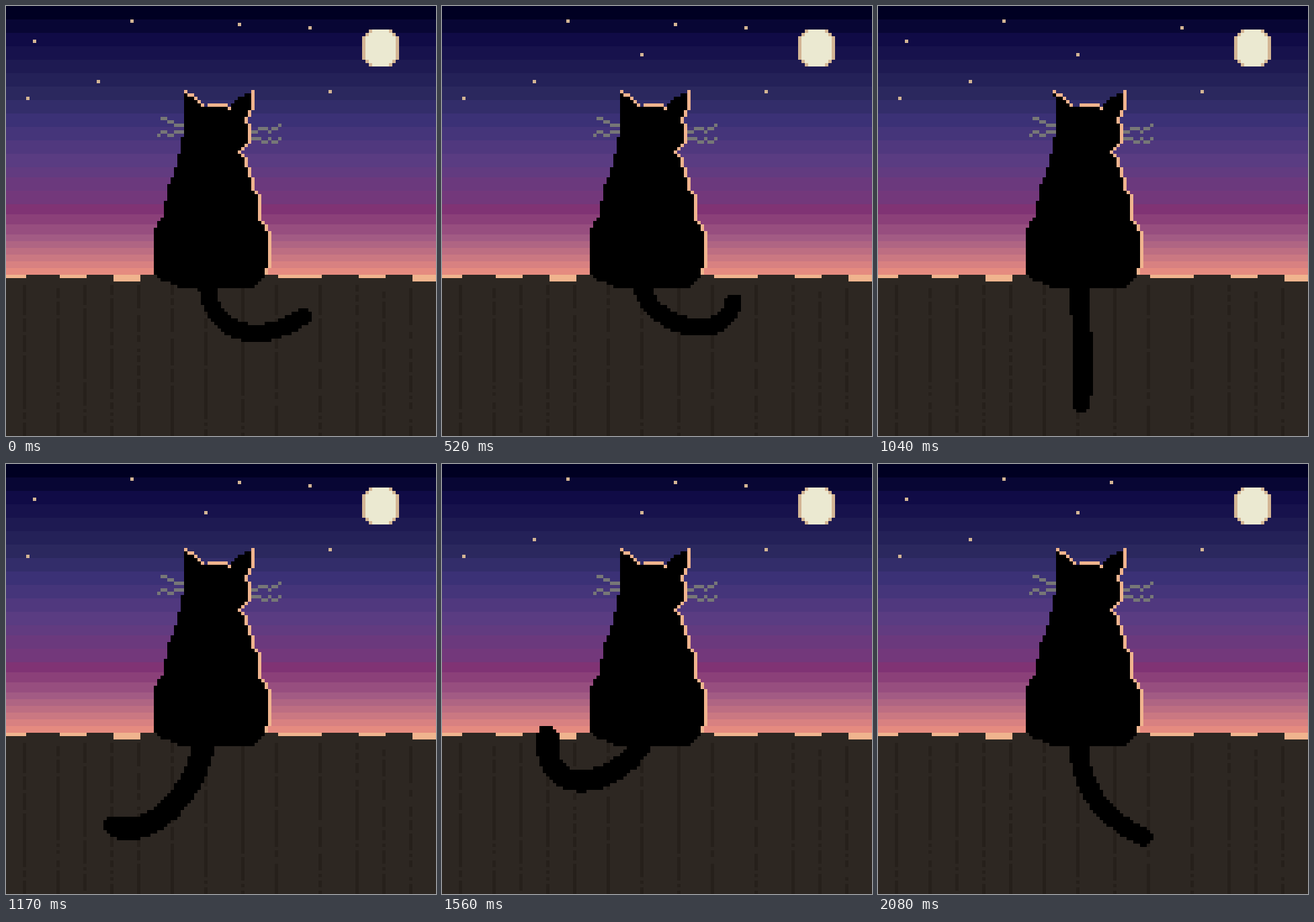
Write an HTML page with a canvas that moves like this. It is 640 by 640 pixels and loops after 2.21 s.

```html
<!DOCTYPE html>
<html lang="en">
<head>
<meta charset="utf-8">
<title>Cat on a fence</title>
<style>
  html, body { margin: 0; width: 100%; height: 100%; overflow: hidden; background: #000022; }
  canvas { display: block; width: 640px; height: 640px; }
</style>
</head>
<body>
<canvas id="stage" width="640" height="640"></canvas>
<script>
const ctx = document.getElementById('stage').getContext('2d');
const CELL = 5, STEP_MS = 130, STEPS = 17;
const RIM = '#f0b48e', BLACK = '#000000';

const snap = v => Math.floor(v / CELL) * CELL;
const lerp = (a, b, t) => a + (b - a) * t;

function rect(color, x, y, w = CELL, h = CELL) {
  ctx.fillStyle = color;
  ctx.fillRect(x, y, w, h);
}

// Interpolates between [position, value, value...] keys
function between(keys, at) {
  const next = Math.max(1, keys.findIndex(key => key[0] >= at));
  const a = keys[next - 1], b = keys[next];
  return a.slice(1).map((v, i) => lerp(v, b[i + 1], (at - a[0]) / (b[0] - a[0])));
}

// Band number, then red, green, blue
const SKY = [[0, 0, 0, 34], [2, 16, 11, 70], [6, 43, 40, 94], [8, 59, 49, 118], [11, 90, 60, 130],
  [14, 115, 56, 123], [15, 128, 51, 116], [18, 162, 91, 132], [23, 229, 139, 128], [24, 240, 180, 142]];

function drawSky() {
  for (let band = 0, y = 0; band < 25; band++) {
    const height = band < 12 || band === 13 || band === 14 ? 20 : band < 18 ? 15 : 10;
    rect(`rgb(${between(SKY, band).map(Math.round)})`, 0, y, 640, height);
    y += height;
  }
}

function drawMoon() {
  for (let inset = 0; inset <= 10; inset += CELL) {
    rect('#d3b594', 530 + inset, 45 - inset, 55 - 2 * inset, 35 + 2 * inset);
  }
  for (let inset = 0; inset <= 10; inset += CELL) {
    rect('#ebe9d1', 535 + inset, 45 - inset, 45 - 2 * inset, 35 + 2 * inset);
  }
}

// Position, then the two steps at which the star is dark
const STARS = [[40, 50, 4, 12], [185, 20, 3, 10], [345, 25, 8, 15], [450, 30, 2, 16],
  [295, 70, 0, 13], [135, 110, 1, 9], [30, 135, 7, 14], [480, 125, 6, 10]];

function drawStars(step) {
  for (const [x, y, ...dark] of STARS) if (!dark.includes(step)) rect('#d3b594', x, y);
}

const PLANK_EDGES = [0, 30, 80, 120, 160, 200, 250, 300, 355, 405, 470, 525, 565, 605, 640];
const PLANK_DROPS = '10102000010102';

function drawFence() {
  [...PLANK_DROPS].forEach((drop, i) => {
    const left = PLANK_EDGES[i], right = PLANK_EDGES[i + 1], top = 400 + drop * CELL;
    rect('#2d2722', left, top, right - left, 640 - top);
    if (right === 640) return;
    for (let y = 415; y < 640; y += CELL) {
      const noise = Math.abs(Math.sin(right * 12.99 + y * 78.23) * 43758.5) % 1;
      if (noise > 0.15) rect('#26201b', right - CELL, y);
    }
  });
}

// Body outline as [y, x]
const LEFT = [[150, 269], [195, 265], [240, 255], [265, 245], [315, 235], [330, 223], [400, 223],
  [407, 231], [413, 247], [420, 260]];
const RIGHT = [[150, 367], [170, 356], [178, 363], [203, 362], [217, 346], [227, 356], [257, 365.3],
  [272, 369], [283, 376], [317, 378], [337, 392], [388, 391], [393, 387], [403, 386], [407, 382],
  [420, 370.5]];

function drawBody() {
  for (let y = 150; y < 420; y += CELL) {
    const left = snap(between(LEFT, y + 2.5)[0]), right = snap(between(RIGHT, y + 2.5)[0]);
    rect(BLACK, left, y, right - left);
    if (y < 400) rect(RIM, right, y);
  }
  rect(RIM, 300, 145, 30);
  rect(RIM, 330, 150);
}

// An ear runs from its top down to the head; the rim light follows its right side
function drawEar(top, leftTop, leftBase, rightTop, rightBase) {
  const edge = (from, to, y) => snap(lerp(from, to, (y + 2.5 - top) / (150 - top)));
  for (let y = top; y < 150; y += CELL) {
    const left = edge(leftTop, leftBase, y), right = edge(rightTop, rightBase, y);
    const below = edge(rightTop, rightBase, y + CELL);
    if (y > top || right - left > CELL) rect(BLACK, left, y, right - left);
    rect(RIM, right, y, Math.max(CELL, below - right));
  }
}

function drawEars(step) {
  if (step === 8) drawEar(125, 260, 270, 260, 290);
  else drawEar(125, 265, 265, 265, 295);
  if (step === 2) drawEar(135, 360, 334, 378, 363);
  else drawEar(125, 365, 333, 365, 365);
}

// Each digit is the drop, in cells, of one cell of the whisker
function drawWhisker(x, y, drops) {
  [...drops].forEach((drop, i) => rect('#777777', x + i * CELL, y + drop * CELL));
}

function drawWhiskers() {
  drawWhisker(230, 165, '0011222');
  drawWhisker(225, 185, '10011000');
  drawWhisker(365, 175, '221112110');
  drawWhisker(365, 195, '000110110');
}

// Tail poses from far left to far right: four Bezier points, then the radius
const TAIL = [
  [298, 412, 270, 475, 150, 510, 157, 405, 16],
  [295, 415, 285, 480, 220, 563, 162, 539, 16.5],
  [300, 415, 302, 480, 308, 540, 302, 590, 14.5],
  [298, 415, 302, 485, 335, 525, 394, 555, 14],
  [300, 415, 302, 485, 375, 510, 442, 462, 13],
  [297, 415, 310, 480, 420, 505, 434, 442, 13]
];

// The swing is steady, but slows down on the right and rests on the left
function tailPose(step) {
  const away = Math.abs((step + 6) % STEPS - 9);
  const place = away > 2 ? Math.max(0, 7 - away) : 5.13 - 0.128 * away * away;
  const i = Math.min(4, Math.floor(place));
  return TAIL[i].map((v, k) => lerp(v, TAIL[i + 1][k], place - i));
}

function bezier(a, b, c, d, t) {
  const u = 1 - t;
  return u * u * u * a + 3 * u * u * t * b + 3 * u * t * t * c + t * t * t * d;
}

function drawTail([x0, y0, x1, y1, x2, y2, x3, y3, radius]) {
  for (let t = 0; t <= 1; t += 1 / 64) {
    const cx = bezier(x0, x1, x2, x3, t), cy = bezier(y0, y1, y2, y3, t);
    for (let y = snap(cy - radius); y < cy + radius; y += CELL) {
      for (let x = snap(cx - radius); x < cx + radius; x += CELL) {
        if (Math.hypot(x + 2.5 - cx, y + 2.5 - cy) < radius) rect(BLACK, x, y);
      }
    }
  }
}

function draw(step) {
  drawSky();
  drawMoon();
  drawStars(step);
  drawFence();
  drawWhiskers();
  drawBody();
  drawEars(step);
  drawTail(tailPose(step));
}

let shown = -1;
function tick() {
  const step = Math.floor(performance.now() / STEP_MS) % STEPS;
  if (step !== shown) draw(shown = step);
  requestAnimationFrame(tick);
}
tick();
</script>
</body>
</html>
```
